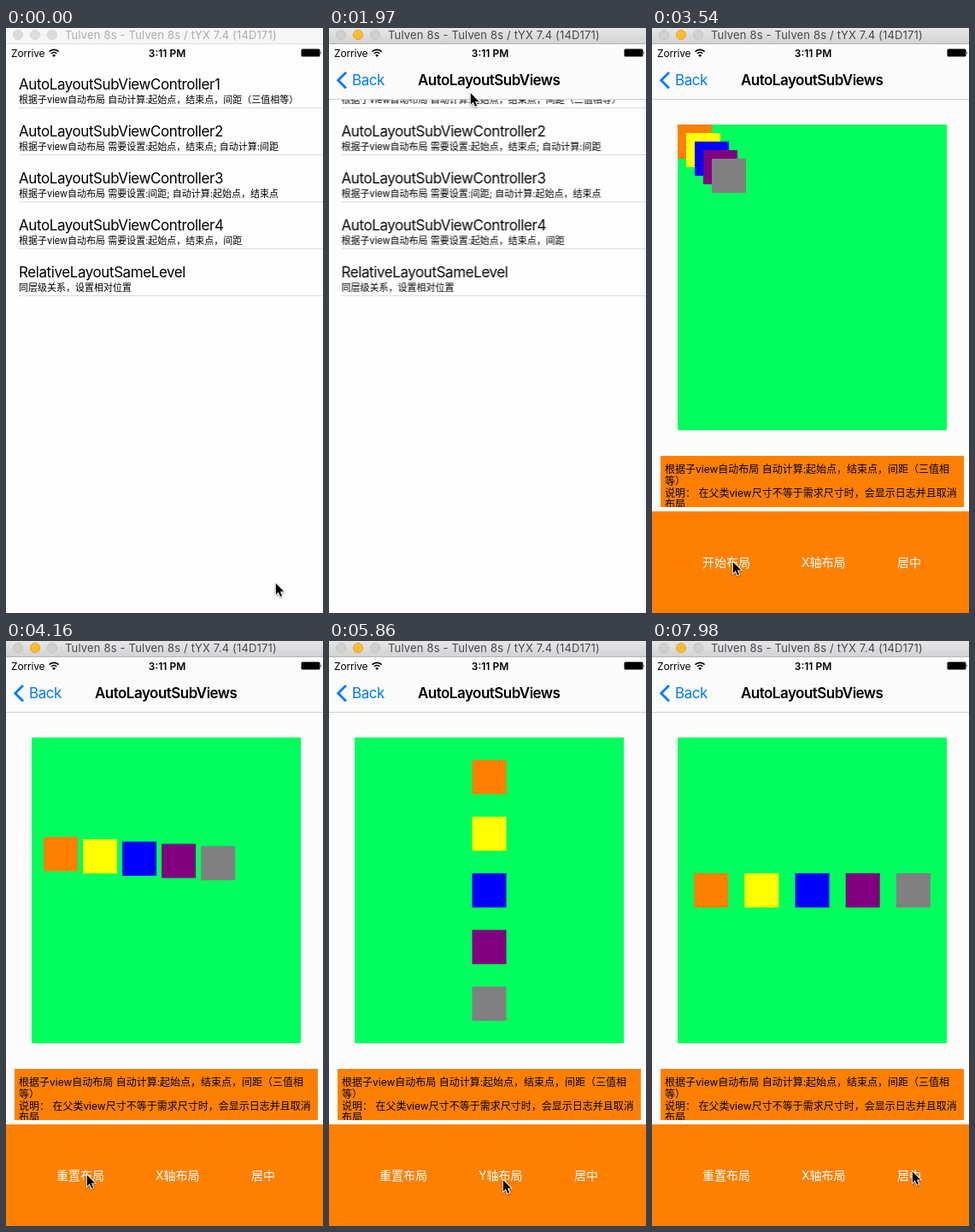
Write an HTML page that moves like this. It is 371 px wide and 685 px high and loops after 8000 ms.

```html
<!DOCTYPE html>
<html lang="zh-CN">
<head>
<meta charset="utf-8">
<title>Auto layout demo</title>
<style>
  html, body { margin: 0; width: 100%; height: 100%; overflow: hidden; background: #fff; }
  svg { display: block; width: 371px; height: 685px; }
  text { font-family: Inter, "Noto Sans CJK SC", "Noto Sans CJK", sans-serif; white-space: pre; }

  .head { font-size: 17px; letter-spacing: -.42px; }
  .bold { font-weight: 600; }
  .head.bold { letter-spacing: -.52px; }
  .sub { font-size: 11px; }
  .note { font-size: 12px; }
  .button { font-size: 14px; fill: #fff; }
  .status { font-size: 12px; letter-spacing: -.15px; }
  .caption { font-size: 13px; letter-spacing: .17px; }

  .anim, .square { animation: 8s linear infinite; }

  /* window becomes active */
  .active { animation-name: activate; }
  @keyframes activate {
    0%, 22.374% { opacity: 0; }
    22.375%, 100% { opacity: 1; }
  }

  /* push transition */
  .nav { animation-name: appear; }
  @keyframes appear {
    0%, 24.624% { opacity: 0; }
    24.625%, 100% { opacity: 1; }
  }
  .list { animation-name: slide-out; }
  .dim { animation-name: dim; }
  .detail { animation-name: slide-in; }
  .list, .dim, .detail {
    animation-timing-function: linear(0, .227, .537, .751, .874, .939, .971, .986, .994, .997, .999, 1);
  }
  @keyframes slide-out {
    0%, 24.625% { transform: translateX(0); }
    31.5%, 100% { transform: translateX(-112px); }
  }
  @keyframes dim {
    0%, 24.625% { opacity: 0; }
    31.5%, 100% { opacity: .1; }
  }
  @keyframes slide-in {
    0%, 24.624% { transform: translateX(375px); opacity: 0; }
    24.625% { transform: translateX(375px); opacity: 1; }
    31.5%, 100% { transform: translateX(0); opacity: 1; }
  }

  /* stack, row, column, row */
  .square { animation-name: arrange; animation-timing-function: ease-in-out; }
  @keyframes arrange {
    0%, 48% { transform: translate(calc(30px + 10px * var(--i)), calc(113px + 10px * var(--i))); }
    54.25%, 67.625% { transform: translate(calc(49.17px + 59.17px * var(--i)), 272px); }
    73.25%, 89.75% { transform: translate(167.5px, calc(139.33px + 66.33px * var(--i))); }
    95.5%, 100% { transform: translate(calc(49.17px + 59.17px * var(--i)), 272px); }
  }

  /* button labels */
  .start { animation-name: start; }
  .reset { animation-name: reset; }
  .axis-x { animation-name: axis-x; }
  .axis-y { animation-name: axis-y; }
  .start, .reset, .axis-x, .axis-y { animation-timing-function: step-end; }
  @keyframes start { 0% { opacity: 1; } 48%, 100% { opacity: 0; } }
  @keyframes reset { 0% { opacity: 0; } 48%, 100% { opacity: 1; } }
  @keyframes axis-x { 0% { opacity: 1; } 67.625% { opacity: 0; } 89.75%, 100% { opacity: 1; } }
  @keyframes axis-y { 0% { opacity: 0; } 67.625% { opacity: 1; } 89.75%, 100% { opacity: 0; } }

  .cursor { animation-name: point; filter: drop-shadow(0 1px .8px #0006); }
  @keyframes point {
    0%, 7.875% { transform: translate(315px, 649px); }
    10.5%, 12.375% { transform: translate(180px, 187px); animation-timing-function: ease-in-out; }
    15.5% { transform: translate(141px, 112px); animation-timing-function: ease-out; }
    19.125%, 34% { transform: translate(165px, 75px); }
    35.1% { transform: translate(85px, 225px); }
    37.25%, 39.5% { transform: translate(190px, 535px); animation-timing-function: ease-in-out; }
    44.25%, 56.875% { transform: translate(94px, 624px); animation-timing-function: ease-in; }
    59.6% { transform: translate(150px, 634px); animation-timing-function: ease-out; }
    62.375%, 96.25% { transform: translate(203px, 630px); animation-timing-function: ease-in-out; }
    99.75%, 100% { transform: translate(304px, 620px); }
  }
</style>
</head>
<body>
<svg viewBox="0 0 371 685">
  <defs>
    <linearGradient id="bar" x2="0" y2="1">
      <stop stop-color="#e6e6e6"/><stop offset="1" stop-color="#d2d2d2"/>
    </linearGradient>
    <linearGradient id="shade">
      <stop stop-opacity="0"/><stop offset="1" stop-opacity=".08"/>
    </linearGradient>
    <clipPath id="noteBox"><path d="M10 501h355v60H10z"/></clipPath>
  </defs>

  <rect width="371" height="685" fill="#fefefe"/>

  <g class="anim list">
    <path d="M15 93.5h360M15 148.5h360M15 203.5h360M15 258.5h360M15 313.5h360" stroke="#dcdcde"/>
    <g class="head">
      <text x="15" y="72">AutoLayoutSubViewController1</text>
      <text x="15" y="127">AutoLayoutSubViewController2</text>
      <text x="15" y="182">AutoLayoutSubViewController3</text>
      <text x="15" y="237">AutoLayoutSubViewController4</text>
      <text x="15" y="292">RelativeLayoutSameLevel</text>
    </g>
    <g class="sub">
      <text x="15" y="88">根据子view自动布局 自动计算:起始点，结束点，间距（三值相等）</text>
      <text x="15" y="143">根据子view自动布局 需要设置:起始点，结束点; 自动计算:间距</text>
      <text x="15" y="198">根据子view自动布局 需要设置:间距; 自动计算:起始点，结束点</text>
      <text x="15" y="253">根据子view自动布局 需要设置:起始点，结束点，间距</text>
      <text x="15" y="308">同层级关系，设置相对位置</text>
    </g>
  </g>
  <rect class="anim dim" width="371" height="685"/>

  <g class="anim detail">
    <rect x="-6" width="6" height="685" fill="url(#shade)"/>
    <rect width="375" height="685" fill="#fcfcfc"/>
    <rect x="30" y="113" width="315" height="358" fill="#00ff5c"/>
    <rect class="square" style="--i:0" width="40" height="40" fill="#ff8000"/>
    <rect class="square" style="--i:1" width="40" height="40" fill="#ff0"/>
    <rect class="square" style="--i:2" width="40" height="40" fill="#00f"/>
    <rect class="square" style="--i:3" width="40" height="40" fill="#800080"/>
    <rect class="square" style="--i:4" width="40" height="40" fill="#808080"/>

    <rect x="10" y="501" width="355" height="60" fill="#ff8000"/>
    <g class="note" clip-path="url(#noteBox)">
      <text x="15" y="521">根据子view自动布局 自动计算:起始点，结束点，间距（三值相</text>
      <text x="15" y="534.5">等）</text>
      <text x="15" y="548.5">说明： 在父类view尺寸不等于需求尺寸时，会显示日志并且取消</text>
      <text x="15" y="562">布局</text>
    </g>

    <rect y="566" width="375" height="119" fill="#ff8000"/>
    <g class="button">
      <text class="anim start" x="59" y="631">开始布局</text>
      <text class="anim reset" x="59" y="631">重置布局</text>
      <text class="anim axis-x" x="175" y="631">X轴布局</text>
      <text class="anim axis-y" x="175" y="631">Y轴布局</text>
      <text x="287" y="631">居中</text>
    </g>
  </g>

  <g class="anim nav">
    <rect y="19" width="371" height="64" fill="#fbfbfb"/>
    <path d="M0 83.5h371" stroke="#cfcfcf"/>
    <path d="M20 52l-9.3 9.3 9.3 9.3" fill="none" stroke="#007aff" stroke-width="2.8"/>
    <text class="head" x="27" y="67" fill="#007aff">Back</text>
    <text class="head bold" x="187.2" y="67" text-anchor="middle">AutoLayoutSubViews</text>
  </g>

  <g class="status">
    <text x="6" y="33.5">Zorrive</text>
    <g fill="none" stroke="#000" stroke-width="1.7">
      <path d="M50.6 27.6a7.8 7.8 0 0 1 11 0M52.9 30a4.6 4.6 0 0 1 6.4 0"/>
    </g>
    <path d="M56.1 34l-2-2.1a2.9 2.9 0 0 1 4 0z"/>
    <text class="bold" x="188.5" y="33.5" text-anchor="middle" letter-spacing="0">3:11 PM</text>
    <rect x="345.5" y="24.5" width="22" height="9" rx="1.5"/>
    <path d="M368.3 27.2q1.6 1.8 0 3.6z"/>
  </g>

  <rect width="371" height="19" fill="#f6f6f6"/>
  <g fill="#dcdcdc" stroke="#d4d4d4">
    <circle cx="14" cy="8" r="5.5"/><circle cx="34" cy="8" r="5.5"/><circle cx="54" cy="8" r="5.5"/>
  </g>
  <text class="caption" x="69" y="13" fill="#acacac">Tulven 8s - Tulven 8s / tYX 7.4 (14D171)</text>
  <path d="M0 18.5h371" stroke="#dedede"/>
  <g class="anim active">
    <rect width="371" height="19" fill="url(#bar)"/>
    <g fill="#d0d0d0" stroke="#c2c2c2">
      <circle cx="14" cy="8" r="5.5"/>
      <circle cx="34" cy="8" r="5.5" fill="#ffbd2e" stroke="#e0a028"/>
      <circle cx="54" cy="8" r="5.5"/>
    </g>
    <text class="caption" x="69" y="13" fill="#484848">Tulven 8s - Tulven 8s / tYX 7.4 (14D171)</text>
    <path d="M0 18.5h371" stroke="#b4b4b4"/>
  </g>

  <g class="anim cursor">
    <path d="M.8 1.2V14.4L3.8 11.5 6 16.8 8.1 15.9 5.9 10.7H10.2Z" stroke="#fff" stroke-width="1.8" paint-order="stroke"/>
  </g>
</svg>
</body>
</html>
```
